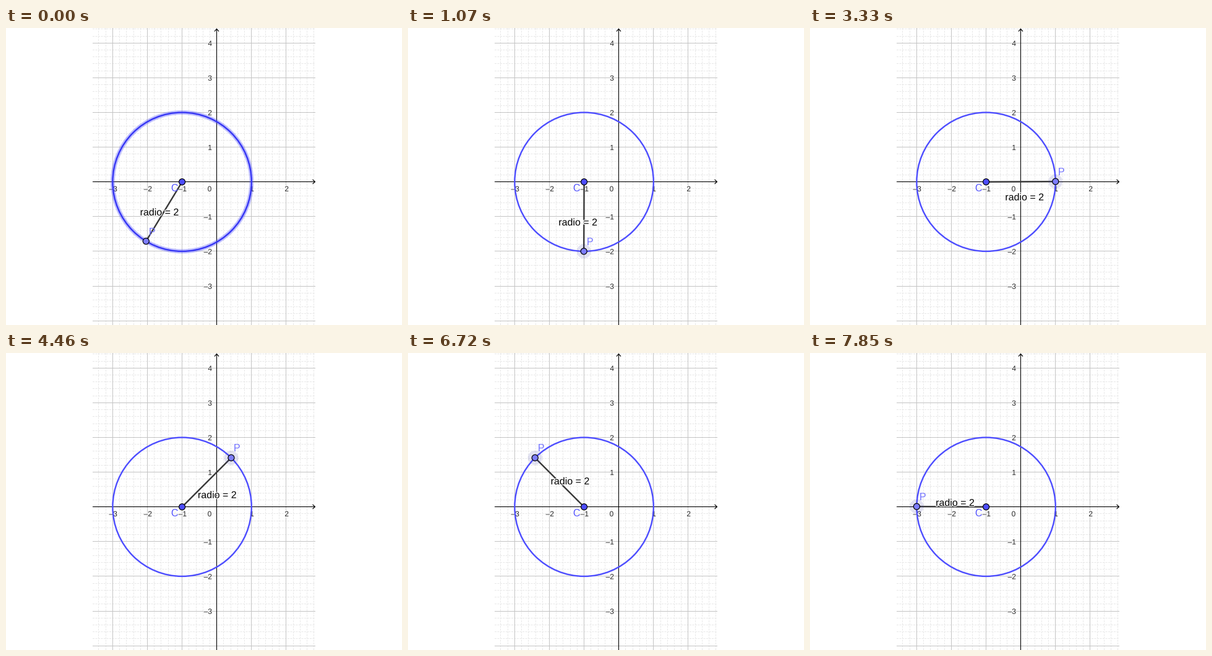
Animation, 640 px wide and 480 px high, one loop 8.98 s. Source, as a matplotlib script:

```python
import numpy as np
import matplotlib.pyplot as plt
import matplotlib.patheffects as pe
from matplotlib.animation import FuncAnimation
from matplotlib.collections import LineCollection
from matplotlib.patches import Circle

W, H, DPI = 640, 480, 100
PX = 72 / DPI                       # points per pixel
LEFT, RIGHT = 140, 500
OX, OY, UNIT = 340.7, 248.7, 56.1   # origin and unit length in pixels
RADIUS = 2 * UNIT
CX, CY = OX - UNIT, OY

LOOP, STEP = 8980, 20
FIRST, HOLD = 1070, 1130
ANGLES = np.radians([-121.3, -90.2, -45, 0.3, 45, 89.8, 135, 179.7])

BLUE, PALE = "#4d4dff", "#7d7dff"

fig = plt.figure(figsize=(W / DPI, H / DPI), dpi=DPI, facecolor="white")
ax = fig.add_axes([0, 0, 1, 1])
ax.set_xlim(0, W)
ax.set_ylim(H, 0)
ax.axis("off")


def crisp(v):
    """Centre of the pixel that holds v."""
    return np.floor(v) + 0.5


def label(x, y, text, size, color="black", ha="center", halo=2.5, z=8):
    """Text whose capitals are centred vertically on y."""
    t = ax.text(x, y + 0.358 * size, text, fontsize=size * PX, color=color,
                family="Liberation Sans", ha=ha, va="baseline", zorder=z)
    if halo:
        t.set_path_effects([pe.withStroke(linewidth=halo * PX,
                                          foreground="white")])
    return t


def line(xs, ys, width, color="black", z=3):
    return ax.plot(xs, ys, color=color, lw=width * PX, zorder=z,
                   solid_capstyle="butt", snap=False)[0]


def disc(x, y, r, face, edge="black", width=1.2, alpha=None, z=7):
    return ax.add_patch(Circle((x, y), r, facecolor=face, edgecolor=edge,
                               lw=width * PX, alpha=alpha, zorder=z))


def draw_grid():
    major, minor = [], []
    for k in range(-17, 15):
        x = crisp(OX + k * UNIT / 5)
        (minor if k % 5 else major).append([(x, 0), (x, H)])
    for k in range(-20, 23):
        y = crisp(OY - k * UNIT / 5)
        (minor if k % 5 else major).append([(LEFT, y), (RIGHT, y)])
    for lines, color, style, z in ((minor, "#e8e8e8", (0, (3, 1.5)), 1),
                                   (major, "#c4c4c4", "solid", 2)):
        grid = LineCollection(lines, colors=color, lw=PX, linestyles=style,
                              zorder=z)
        grid.set_snap(False)
        ax.add_collection(grid)


def draw_axes():
    x, y = crisp(OX), crisp(OY)
    line([LEFT, RIGHT], [y, y], 1.1)
    line([x, x], [1, H], 1.1)
    line([495.5, 499.5, 495.5], [y - 3.5, y, y + 3.5], 1.2)
    line([x - 3.5, x, x + 3.5], [5.5, 1.5, 5.5], 1.2)
    for n in (-3, -2, -1, 1, 2):
        label(OX + n * UNIT + 0.8, 259.7, str(n).replace("-", "–"), 12,
              "#222222", halo=2, z=3.5)
    for n in (-3, -2, -1, 1, 2, 3, 4):
        label(333, OY - n * UNIT + 0.3, str(n).replace("-", "–"), 12,
              "#222222", "right", halo=2, z=3.5)
    label(329, 259.7, "0", 12, "#222222", halo=2, z=3.5)


draw_grid()
draw_axes()

glow = disc(CX, CY, RADIUS, "none", BLUE, 7, alpha=0.35, z=4)
ring = disc(CX, CY, RADIUS, "none", BLUE, 2.4, z=5)
radius = line([CX, CX], [CY, CY], 2.4, "#383838", 6)
halo = disc(CX, CY, 11.5, "#4040a8", "none", 0, alpha=0.15, z=6.5)
disc(CX, CY, 5, BLUE)
point = disc(CX, CY, 5, PALE)
label(271.7, 258.5, "C", 16, BLUE, halo=0)
name = label(0, 0, "P", 16, "#7070ff", halo=0)
caption = label(0, 0, "radio = 2", 16)


def place(text, x, y):
    text.set_position((x, y + 0.358 * 16))


def update(i):
    t = i * STEP + STEP / 2
    pose = 0 if t < FIRST else 1 + int((t - FIRST) // HOLD)
    c, s = np.cos(ANGLES[pose]), np.sin(ANGLES[pose])
    x, y = CX + RADIUS * c, CY - RADIUS * s

    # the circle is highlighted at rest, the point while dragged
    glow.set_visible(pose == 0)
    halo.set_visible(pose > 0)
    ring.set_edgecolor("#3636f4" if pose == 0 else BLUE)

    radius.set_data([CX, x], [CY, y])
    point.center = halo.center = (x, y)
    place(name, x + 9.5, y - 15.7)
    place(caption, (CX + x) / 2 + 5.9 + 15.7 * s,
          (CY + y) / 2 + 8.7 + 15.7 * c)
    return glow, ring, radius, halo, point, name, caption


anim = FuncAnimation(fig, update, frames=LOOP // STEP, interval=STEP,
                     repeat=True, repeat_delay=0, blit=False)
plt.show()
```
